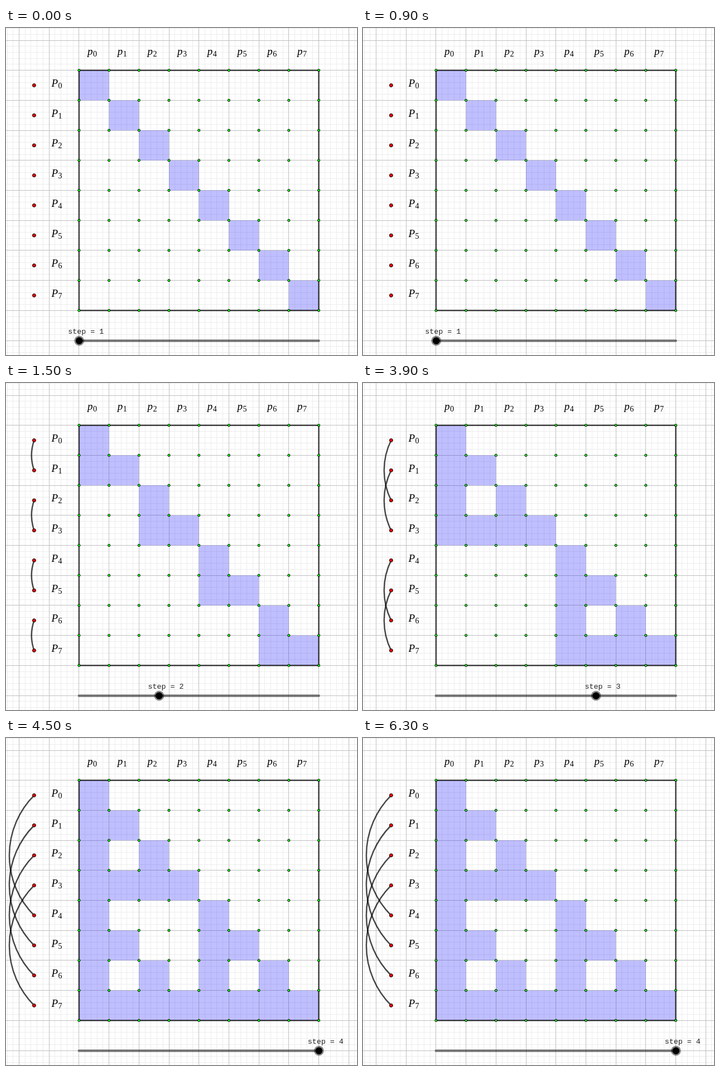
An HTML page for the animation above (7.5 s loop, 629 by 585 pixels).

```html
<!DOCTYPE html>
<html lang="en">
<head>
<meta charset="utf-8">
<title>Butterfly steps</title>
<style>
html, body { margin: 0; width: 100%; height: 100%; overflow: hidden; background: #fff; }
svg { display: block; }
.minor, .major { fill: none; shape-rendering: crispEdges; }
.minor { stroke: #ededed; }
.major { stroke: #c0c0c0; }
.cell { fill: rgba(0, 0, 255, .25); }
.line { fill: none; stroke: #000; stroke-opacity: .72; stroke-width: 2.5; stroke-linecap: round; }
.node { fill: #00ff00; stroke: #000; stroke-width: 1; }
.item { fill: #e60000; stroke: #000; stroke-width: 1; }
.label { font: italic 19px "Liberation Serif", "Times New Roman", serif; }
.sub { font: 14px "Liberation Serif", "Times New Roman", serif; }
.step { font: 13.33px "Liberation Mono", "Courier New", monospace; fill: #222; }
</style>
</head>
<body>
<svg id="stage" width="629" height="585" viewBox="0 0 629 585"></svg>
<script>
const W = 629, H = 585, N = 8, U = 53.7, X = 130.9, Y = 75.7, ITEM_X = 50.4;
const stage = document.getElementById('stage');

function add(parent, tag, attrs = {}, text = '') {
  const el = document.createElementNS('http://www.w3.org/2000/svg', tag);
  for (const key in attrs) el.setAttribute(key, attrs[key]);
  el.textContent = text;
  parent.appendChild(el);
  return el;
}

const colX = c => X + c * U;
const rowY = r => Y + r * U;
const midY = r => rowY(r + 0.5);

function grid(cls, gap) {
  let d = '';
  for (let x = X % gap; x < W; x += gap) d += `M${Math.floor(x) + 0.5} 0V${H}`;
  for (let y = Y % gap; y < H; y += gap) d += `M0 ${Math.floor(y) + 0.5}H${W}`;
  add(stage, 'path', { class: cls, d });
}

function label(letter, i, x, y) {
  add(stage, 'text', { class: 'label', x, y }, letter);
  add(stage, 'text', { class: 'sub', x: x + (letter === 'P' ? 12 : 10), y: y + 3 }, i);
}

grid('minor', U / 5);
grid('major', U);
const cells = add(stage, 'g');
const arcs = add(stage, 'g');
add(stage, 'rect', { class: 'line', x: X, y: Y, width: N * U, height: N * U });

for (let i = 0; i <= N; i++)
  for (let j = 0; j <= N; j++)
    add(stage, 'circle', { class: 'node', cx: colX(j), cy: rowY(i), r: 2.1 });

for (let i = 0; i < N; i++) {
  add(stage, 'circle', { class: 'item', cx: ITEM_X, cy: midY(i), r: 3 });
  label('P', i, 81.5, 105 + i * U);
  label('p', i, 146, 47.5 + i * U * 0);
  stage.lastChild.setAttribute('x', 156 + i * U);
  stage.lastChild.previousSibling.setAttribute('x', 146 + i * U);
}

const slideY = 559.5;
add(stage, 'path', {
  d: `M${X} ${slideY}H${colX(N)}`, stroke: '#000', 'stroke-opacity': 0.5,
  'stroke-width': 4.5, 'stroke-linecap': 'round'
});
const knob = add(stage, 'g');
add(knob, 'circle', { r: 9, fill: '#000', 'fill-opacity': 0.45 });
add(knob, 'circle', { r: 6.3 });
const caption = add(knob, 'text', { class: 'step', x: -20, y: -12.5 });

function show(step) {
  cells.replaceChildren();
  arcs.replaceChildren();
  const block = step - 1;
  for (let r = 0; r < N; r++)
    for (let c = 0; c <= r; c++)
      if ((c & ~r) === 0 && r >> block === c >> block)
        add(cells, 'rect', { class: 'cell', x: colX(c), y: rowY(r), width: U, height: U });

  if (step > 1) {
    const gap = 2 ** (step - 2);
    const radius = [82, 121, 152][step - 2];
    for (let i = 0; i < N; i++)
      if (!(i & gap))
        add(arcs, 'path', {
          class: 'line',
          d: `M${ITEM_X} ${midY(i)}A${radius} ${radius} 0 0 0 ${ITEM_X} ${midY(i + gap)}`
        });
  }
  knob.setAttribute('transform', `translate(${X + 0.3 + (step - 1) * N * U / 3} ${slideY})`);
  caption.textContent = `step = ${step}`;
}

let shown = 0;
function tick() {
  const step = Math.min(4, 1 + Math.floor(performance.now() % 7500 / 1500));
  if (step !== shown) show(shown = step);
  requestAnimationFrame(tick);
}
tick();
</script>
</body>
</html>
```
